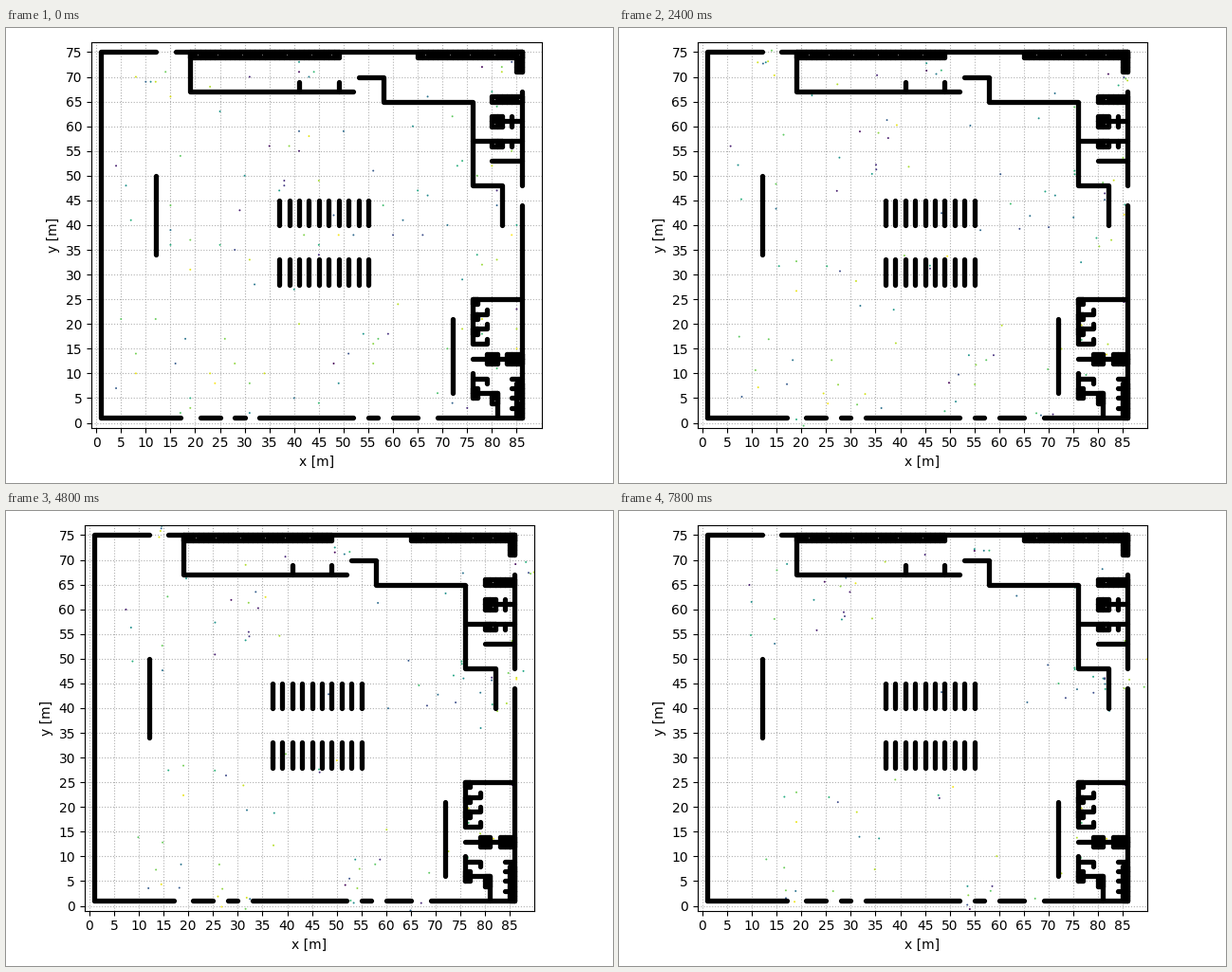
Recreate the animation shown at these times as a matplotlib script. Size 640 by 480 pixels, loop 8 s.

```python
import math

import matplotlib.pyplot as plt
import numpy as np
from matplotlib.animation import FuncAnimation
from matplotlib.collections import LineCollection

FRAMES, INTERVAL = 40, 200
SPEED = 0.36  # metres per frame
PEOPLE = 115

lines, solid = [], set()


def wall(*corners):
    """Draw a rectilinear wall and mark the cells it covers."""
    lines.append(corners)
    for (x0, y0), (x1, y1) in zip(corners, corners[1:]):
        xs = range(min(x0, x1), max(x0, x1) + 1)
        ys = range(min(y0, y1), max(y0, y1) + 1)
        solid.update((x, y) for x in xs for y in ys)


def block(x0, x1, y0, y1):
    for y in range(y0, y1 + 1):
        wall((x0, y), (x1, y))
    for x in range(x0, x1 + 1):
        wall((x, y0), (x, y1))


def build_shell():
    """Outer walls; returns the middle of every doorway."""
    spans = [(1, 17), (21, 25), (28, 30), (33, 52), (55, 57), (60, 65), (69, 86)]
    for a, b in spans:
        wall((a, 1), (b, 1))
    doors = [((a[1] + b[0]) / 2, 0.5) for a, b in zip(spans, spans[1:])]
    wall((1, 1), (1, 75), (12, 75))
    wall((16, 75), (86, 75), (86, 71))
    wall((86, 67), (86, 48))
    wall((86, 44), (86, 1))
    return doors + [(14, 75.5), (86.5, 46), (86.5, 69)]


def build_hall():
    wall((12, 34), (12, 50))
    wall((72, 6), (72, 21))
    for x in range(37, 56, 2):
        wall((x, 28), (x, 33))
        wall((x, 40), (x, 45))


def build_top_rooms():
    wall((19, 75), (19, 67), (52, 67))
    wall((53, 70), (58, 70), (58, 65), (76, 65), (76, 48), (82, 48), (82, 40))
    for x in (41, 49):
        wall((x, 67), (x, 69))
    block(19, 49, 74, 75)
    block(65, 86, 74, 75)
    block(85, 86, 71, 75)
    block(80, 86, 65, 66)
    wall((80, 61), (86, 61))
    wall((76, 57), (86, 57))
    wall((80, 53), (86, 53))
    block(80, 82, 60, 62)
    wall((84, 60), (84, 62))
    block(80, 82, 56, 57)
    wall((84, 56), (84, 57))


def build_bottom_rooms():
    wall((86, 25), (76, 25), (76, 16))
    for y in (16, 19, 22):
        wall((76, y), (79, y), (79, y + 1))
        block(76, 77, y + 2, y + 3)
    wall((76, 13), (86, 13))
    block(79, 81, 12, 14)
    block(83, 86, 12, 14)
    wall((76, 5), (76, 10))
    wall((76, 9), (79, 9), (79, 8))
    wall((76, 6), (81, 6), (81, 1))
    block(76, 77, 5, 7)
    block(80, 81, 4, 6)
    block(85, 86, 1, 8)
    for y in range(3, 10, 2):
        wall((84, y), (86, y))


exits = build_shell()
build_hall()
build_top_rooms()
build_bottom_rooms()


def goal(x, y):
    if 19 < x < 57 and y > 67:  # the long room opens to the right
        return 58, 72
    return min(exits, key=lambda e: math.dist(e, (x, y)))


def is_free(x, y):
    return (round(x), round(y)) not in solid


def walk(x, y):
    """Head straight for the nearest exit, sliding along walls."""
    path, dx, dy = [(x, y)], 0, 0
    for _ in range(FRAMES - 1):
        if x <= 86 and 1 <= y <= 75:
            gx, gy = goal(x, y)
            dist = math.dist((gx, gy), (x, y)) or 1
            dx, dy = SPEED * (gx - x) / dist, SPEED * (gy - y) / dist
        if is_free(x + dx, y):
            x += dx
        if is_free(x, y + dy):
            y += dy
        path.append((x, y))
    return path


rng = np.random.default_rng(4)
cells = [(x, y) for x in range(2, 86) for y in range(2, 75) if is_free(x, y)]
starts = rng.choice(cells, PEOPLE, replace=False)
tracks = np.array([walk(x, y) for x, y in starts]).swapaxes(0, 1)
shades = plt.cm.viridis(rng.random(PEOPLE))

fig, ax = plt.subplots(figsize=(6.4, 4.8), dpi=100, facecolor="white")
ax.set(xlim=(-1, 90), ylim=(-1, 77), xlabel="x [m]", ylabel="y [m]",
       xticks=range(0, 86, 5), yticks=range(0, 76, 5), aspect="equal")
ax.grid(True, linestyle=":")
ax.add_collection(LineCollection(lines, colors="black", linewidths=3.8,
                                 capstyle="round", zorder=3))
dots = ax.scatter(*tracks[0].T, s=2, c=shades, linewidths=0, zorder=2)


def fit():
    fig.tight_layout()
    return ax.get_position(original=True)


# the layout settles on its second pass, which moves the plot a little left
first, settled = fit(), fit()


def draw(i):
    ax.set_position(settled if i else first)
    dots.set_offsets(tracks[i])
    return (dots,)


def reset():
    return draw(0)


anim = FuncAnimation(fig, draw, frames=FRAMES, init_func=reset,
                     interval=INTERVAL, repeat=True, repeat_delay=0, blit=False)
plt.show()
```
